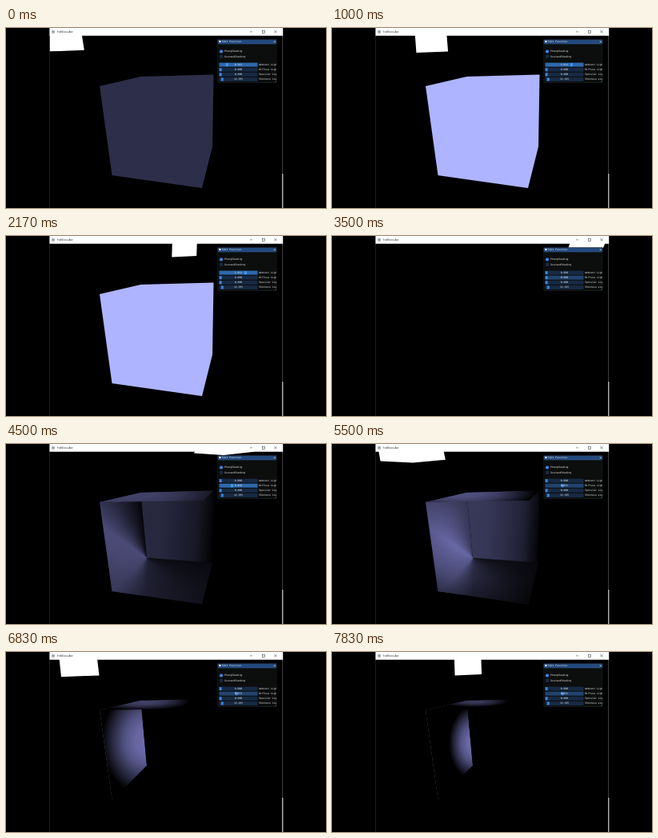
An HTML page with a canvas for the animation above (8 s loop, 400x226 px).

```html
<!DOCTYPE html>
<html lang="en">
<head>
<meta charset="utf-8">
<title>hellocube</title>
<style>
html, body { margin: 0; width: 100%; height: 100%; overflow: hidden; background: #000; }
canvas { display: block; width: 100vw; height: 100vh; }
</style>
</head>
<body>
<canvas id="stage"></canvas>
<script>
const LOOP = 8000, FRAMES = 48;
const MONO = '3.12px "DejaVu Sans Mono", monospace';
const FALLOFF = [1, .95, .75, .4, 0];
const canvas = document.getElementById('stage');
const ctx = canvas.getContext('2d');
const ratio = window.devicePixelRatio || 1;
canvas.width = 400 * ratio;
canvas.height = 226 * ratio;

// Cube silhouette A to F, with its far and near corners
const A = [117, 73], B = [168.5, 61], C = [259.5, 58.5], D = [258, 149],
  E = [245, 201], F = [132.5, 185], FAR = [176, 143], NEAR = [246.5, 71];

const clamp = v => Math.min(1, Math.max(0, v));
const ramp = (t, from, to) => clamp((t - from) / (to - from));
const tone = k => `rgb(${108 * k},${108 * k},${172 * k})`;
const shadow = k => `rgba(0,0,0,${1 - k})`;

function trace(points) {
  ctx.beginPath();
  points.forEach(p => ctx.lineTo(...p));
  ctx.closePath();
}

function shape(points, fill) {
  trace(points);
  ctx.fillStyle = fill;
  ctx.fill();
}

function box(x, y, w, h, fill) {
  ctx.fillStyle = fill;
  ctx.fillRect(x, y, w, h);
}

function line(color, ...points) {
  ctx.beginPath();
  points.forEach(p => ctx.lineTo(...p));
  ctx.strokeStyle = color;
  ctx.lineWidth = .6;
  ctx.stroke();
}

function cross(x, y, r, color) {
  line(color, [x - r, y - r], [x + r, y + r]);
  line(color, [x + r, y - r], [x - r, y + r]);
}

function dot(x, y, r, fill) {
  ctx.beginPath();
  ctx.arc(x, y, r, 0, 7);
  ctx.fillStyle = fill;
  ctx.fill();
}

function label(text, x, y, font = MONO, fill = '#eee', align = 'left') {
  ctx.font = font;
  ctx.textAlign = align;
  ctx.textBaseline = 'middle';
  ctx.fillStyle = fill;
  ctx.fillText(text, x, y);
}

function spread(gradient, levels, color) {
  levels.forEach((v, i) => gradient.addColorStop(i / (levels.length - 1), color(v)));
  return gradient;
}

// Fills a face with an elliptical falloff
function glow(points, x, y, rx, ry, color) {
  ctx.save();
  trace(points);
  ctx.clip();
  ctx.translate(x, y);
  ctx.scale(rx, ry);
  box(-20, -20, 40, 40, spread(ctx.createRadialGradient(0, 0, 0, 0, 0, 1), FALLOFF, color));
  ctx.restore();
}

// turn grows as the lamp swings behind the cube
function drawLitCube(turn, power) {
  const rear = clamp(1 - 1.75 * turn) * power;
  const fan = ctx.createConicGradient(0, ...FAR);
  const ray = (degrees, level) => fan.addColorStop(degrees / 360, tone(level));
  ray(0, .12 * rear);
  ray(45, .35 * rear);
  ray(90, .48 * rear);
  ray(136, .9 * rear);
  ray(136, .9 * power);
  ray(215, power);
  ray(265, power * clamp(.5 + turn));

  const inside = [A, B, FAR, D, E, F];
  shape(inside, fan);
  glow(inside, 176, 108 + 6 * turn, 130 * .23 ** turn, 125 * .37 ** turn, shadow);
  shape([B, C, D, FAR], spread(ctx.createLinearGradient(172, 100, 262, 106),
    [.52, .5, .42, .3, 0], v => tone(v * rear)));
  glow([A, B, C, NEAR], 160 + 18 * turn, 62, 95 * .45 ** turn, 20 * .35 ** turn,
    v => tone(v * power * .75 * .7 ** turn));
}

function drawCube(t, ambient, diffuse) {
  if (ambient > 0) {
    const [r, g, b] = [172, 178, 285].map(v => Math.min(255, v * ambient));
    shape([A, B, C, D, E, F], `rgb(${r},${g},${b})`);
  } else if (diffuse > 0) {
    drawLitCube((t - 5500) / 2330, diffuse / .651);
  }
}

// The lamp circles once every 2π seconds, seen in perspective
function drawLamp(t) {
  const c = Math.cos(t / 1000), s = Math.sin(t / 1000);
  const depth = 1 - .081 * c + .379 * s;
  const x = (192.4 - 130.4 * c + 44.9 * s) / depth;
  const y = (23.3 + 2.9 * c + 16.2 * s) / depth;
  const half = (24 + 4 * Math.cos(t / 1000 + .25)) / depth;
  const lean = (200 - x) / 45;
  const sag = Math.max(0, 6 * (1 / depth - 1));
  shape([[x - half - lean, 9], [x - half, y + .8], [x, y + sag], [x + half, y - .8],
    [x + half - lean, 9]], '#fff');
}

function drawSlider(row, name, value, grab, state) {
  const y = 43.6 + row * 6.15, mid = y + 2.6;
  box(266.5, y, 48, 5, ['#172a44', '#22436d', '#2e69ac'][state]);
  box(grab - 1.4, y + .5, 3, 4, state === 2 ? '#4296fa' : '#3d85e0');
  label(value.toFixed(3), 290.5, mid, MONO, '#eee', 'center');
  label(name, 316, mid);
}

function drawPanel(t, ambient, diffuse) {
  ctx.save();
  ctx.beginPath();
  ctx.rect(264.5, 14.4, 73.7, 54.4);
  ctx.clip();
  box(264, 14, 75, 55, '#0b0e0d');
  box(264, 14, 75, 6.3, '#25497c');
  shape([[265.8, 16], [269, 16], [267.4, 18.8]], '#fff');
  label('Edit Function', 270, 17.4);
  cross(335.8, 17.3, 1, '#ddd');

  dot(269, 29.5, 2.3, '#2a5a98');
  dot(269, 29.5, 1.5, '#4296fa');
  dot(269, 35.7, 2.3, '#172a44');
  label('PhongShading', 273, 29.6);
  label('GouraudShading', 273, 35.8);

  const ambientState = t < 3200 ? 2 : 0;
  const diffuseState = t < 3200 ? 0 : t > 3600 && t < 4900 ? 2 : 1;
  drawSlider(0, 'Ambient Light', ambient, 268 + ambient * 31, ambientState);
  drawSlider(1, 'Diffuse Light', diffuse, 268 + diffuse * 31, diffuseState);
  drawSlider(2, 'Specular Light', 0, 268, 0);
  drawSlider(3, 'Shinness Light', 12.195, 270.2, 0);
  shape([[338, 66], [338, 68.6], [335.4, 68.6]], '#27486f');
  ctx.strokeStyle = '#25282c';
  ctx.lineWidth = .6;
  ctx.strokeRect(264.7, 14.6, 73.3, 54);
  ctx.restore();
}

function drawWindow() {
  box(54, 9, .7, 217, '#2a2a2a');
  box(345.3, 9, .8, 174, '#555');
  box(345.3, 183, 1, 43, '#fff');
  box(54.4, 0, 291.8, 9.7, '#fff');
  box(57.2, 3, 3.6, 3.6, '#9aa7b2');
  label('hellocube', 64, 4.9, '4.35px "Open Sans", sans-serif', '#222');
  line('#444', [304.9, 4.8], [307.9, 4.8]);
  ctx.strokeRect(320.4, 3.2, 3.2, 3.2);
  cross(336.9, 4.7, 1.6, '#444');
}

function draw(now) {
  const step = LOOP / FRAMES;
  const t = Math.floor((now % LOOP) / step + .05) % FRAMES * step;
  const ambient = (.261 + .75 * ramp(t, 0, 833)) * (1 - ramp(t, 2600, 3170));
  const diffuse = .651 * ramp(t, 3670, 4830);
  ctx.setTransform(ratio, 0, 0, ratio, 0, 0);
  box(0, 0, 400, 226, '#000');
  ctx.save();
  ctx.beginPath();
  ctx.rect(54.5, 9, 291, 217);
  ctx.clip();
  drawCube(t, ambient, diffuse);
  drawLamp(t);
  ctx.restore();
  drawPanel(t, ambient, diffuse);
  drawWindow();
}

const start = performance.now();
function tick() {
  draw(performance.now() - start);
  requestAnimationFrame(tick);
}
tick();
</script>
</body>
</html>
```
